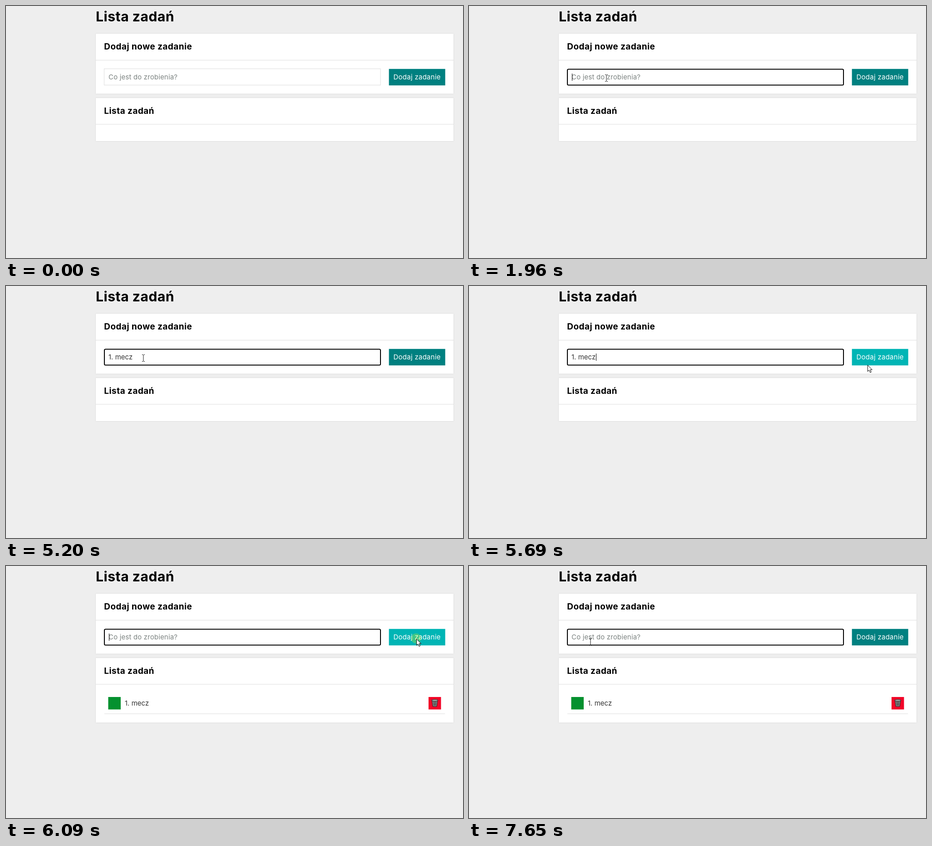
These frames come from a looping animation (1008x556 px, 8000 ms). An HTML page:

```html
<!DOCTYPE html>
<html lang="pl">
<head>
<meta charset="utf-8">
<title>Lista zadań</title>
<style>
  html, body { margin: 0; width: 100%; height: 100%; overflow: hidden; background: #eee; }
  svg { display: block; width: 1008px; height: 556px; }
  text { font: 15px Inter, "Open Sans", sans-serif; fill: #333; white-space: pre; }
  .title { font-weight: 700; fill: #000; letter-spacing: .45px; }
  .big { font-size: 30.2px; }
  .mid { font-size: 19px; }
  .hint { fill: #7c8381; letter-spacing: .17px; }
  .label { fill: #fff; letter-spacing: .27px; }
  .card { fill: #fff; filter: drop-shadow(0 0 1px #ccc); }
  .line { fill: #ddd; }
</style>
</head>
<body>
<svg viewBox="0 0 1008 556">
  <text class="title big" x="198" y="34">Lista zadań</text>

  <rect class="card" x="198" y="61" width="789" height="132.5"/>
  <text class="title mid" x="216.3" y="96">Dodaj nowe zadanie</text>
  <rect class="line" x="198" y="119" width="789" height="1"/>
  <rect id="field" fill="#fff"/>
  <text id="hint" class="hint" x="226" y="161.5">Co jest do zrobienia?</text>
  <text id="typed" x="226" y="161.5"></text>
  <rect id="caret" y="149" width="1" height="16"/>
  <rect id="button" x="844.6" y="138.8" width="124.2" height="36.4"/>
  <text class="label" x="854.5" y="161.5">Dodaj zadanie</text>

  <rect id="list" class="card" x="198" y="203" width="789"/>
  <text class="title mid" x="216.3" y="237.5">Lista zadań</text>
  <rect class="line" x="198" y="260.5" width="789" height="1"/>
  <g id="item">
    <rect x="225.5" y="289" width="27.5" height="27.5" fill="#04912f"/>
    <text x="262" y="307.5">1. mecz</text>
    <rect x="932" y="289" width="27.5" height="27.5" fill="#f20528"/>
    <g stroke="#222" stroke-linejoin="round">
      <path d="M939.5 297 L941.5 310 H950 L952 297Z" fill="#888"/>
      <path d="M943 299 l1 9 M945.8 299 v9 M948.6 299 l-1 9" stroke-width=".8"/>
      <ellipse cx="945.8" cy="296.3" rx="7" ry="2" fill="#aaa"/>
    </g>
    <rect class="line" x="217" y="325.5" width="751.5" height="1"/>
  </g>

  <circle id="halo" r="11" fill="#ff0"/>
  <path id="arrow" d="M0 0V14L3.2 11L5.6 16.4L8 15.4L5.7 10.2H10Z" fill="#fff" stroke="#000"/>
  <path id="beam" d="M-3 -7.5H-1L0 -6.5L1 -7.5H3M0 -6.5V6.5M-3 7.5H-1L0 6.5L1 7.5H3" fill="none" stroke="#111"/>
</svg>
<script>
const $ = id => document.getElementById(id);
const set = (id, attrs) => { for (const k in attrs) $(id).setAttribute(k, attrs[k]); };
const show = (id, on) => $(id).style.display = on ? "" : "none";

const LOOP = 8000, TICK = 70, BLINK = 500;
const TASK = "1. mecz";
const FIELD_CLICK = 1410, FOCUS = 1480, BUTTON_CLICK = 5900, ADDED = 6090;

// "1" and "." come slowly, the rest at an even pace
const keys = [...TASK].map((_, i) => i < 2 ? 2420 + 485 * i : 3610 + 267 * (i - 2));

// resting places of the pointer
const corner = [914, 540], inField = [303, 159], onButton = [905.5, 161],
      byTask = [265.5, 316], backInField = [268, 167.5];

const moves = [
  { start: 320, end: 1080, from: corner, bend: [430, 130], to: inField },
  { start: 5200, end: 5760, from: inField, bend: [600, 326], to: onButton },
  { start: ADDED, end: 6510, from: onButton, bend: [480, 350], to: byTask },
  { start: 6510, end: 7530, from: byTask, bend: [310, 250], to: backInField }
];

function pointer(t) {
  const m = moves.filter(m => t >= m.start).pop();
  if (!m) return null;
  const k = Math.min(1, Math.floor((t - m.start) / TICK) * TICK / (m.end - m.start));
  const u = k * k * (3 - 2 * k), v = 1 - u;
  return m.from.map((a, i) => v * v * a + 2 * u * v * m.bend[i] + u * u * m.to[i]);
}

function halo(t) {
  const age = t - (t < BUTTON_CLICK ? FIELD_CLICK : BUTTON_CLICK);
  return age < 0 || age >= 200 ? 0 : age < 120 ? .5 : .25;
}

function render(t) {
  const added = t >= ADDED;
  const focus = t >= FOCUS && t < BUTTON_CLICK || added;
  const count = added ? 0 : keys.filter(k => t >= k).length;
  $("typed").textContent = TASK.slice(0, count);
  show("hint", !count);
  show("item", added);
  set("list", { height: added ? 142.5 : 95 });

  set("field", focus
    ? { x: 217, y: 139.5, width: 609, height: 35, rx: 2.5, stroke: "#000", "stroke-width": 2 }
    : { x: 216.5, y: 138.5, width: 609.5, height: 36, rx: 0, stroke: "#ddd", "stroke-width": 1 });

  // each key or new focus restarts the blinking
  const last = [FOCUS, ...keys, ADDED].filter(k => t >= k).pop();
  show("caret", focus && (t - last) % (2 * BLINK) < BLINK);
  set("caret", { x: Math.round(226.5 + (count ? $("typed").getComputedTextLength() : 0)) });

  const p = pointer(t), [x, y] = p || [0, 0];
  const inRow = y >= 138 && y <= 175;
  const overField = inRow && x > 216 && x < 827;
  set("button", { fill: inRow && x > 845 && x < 969 ? "#00b5b5" : "#008080" });
  show("arrow", p && !overField);
  show("beam", p && overField);
  for (const id of ["arrow", "beam"]) set(id, { transform: `translate(${x} ${y})` });
  set("halo", { cx: x - 1, cy: y - 1.3, opacity: halo(t) });
}

const began = performance.now();
function frame() {
  render((performance.now() - began) % LOOP);
  requestAnimationFrame(frame);
}
frame();
</script>
</body>
</html>
```
